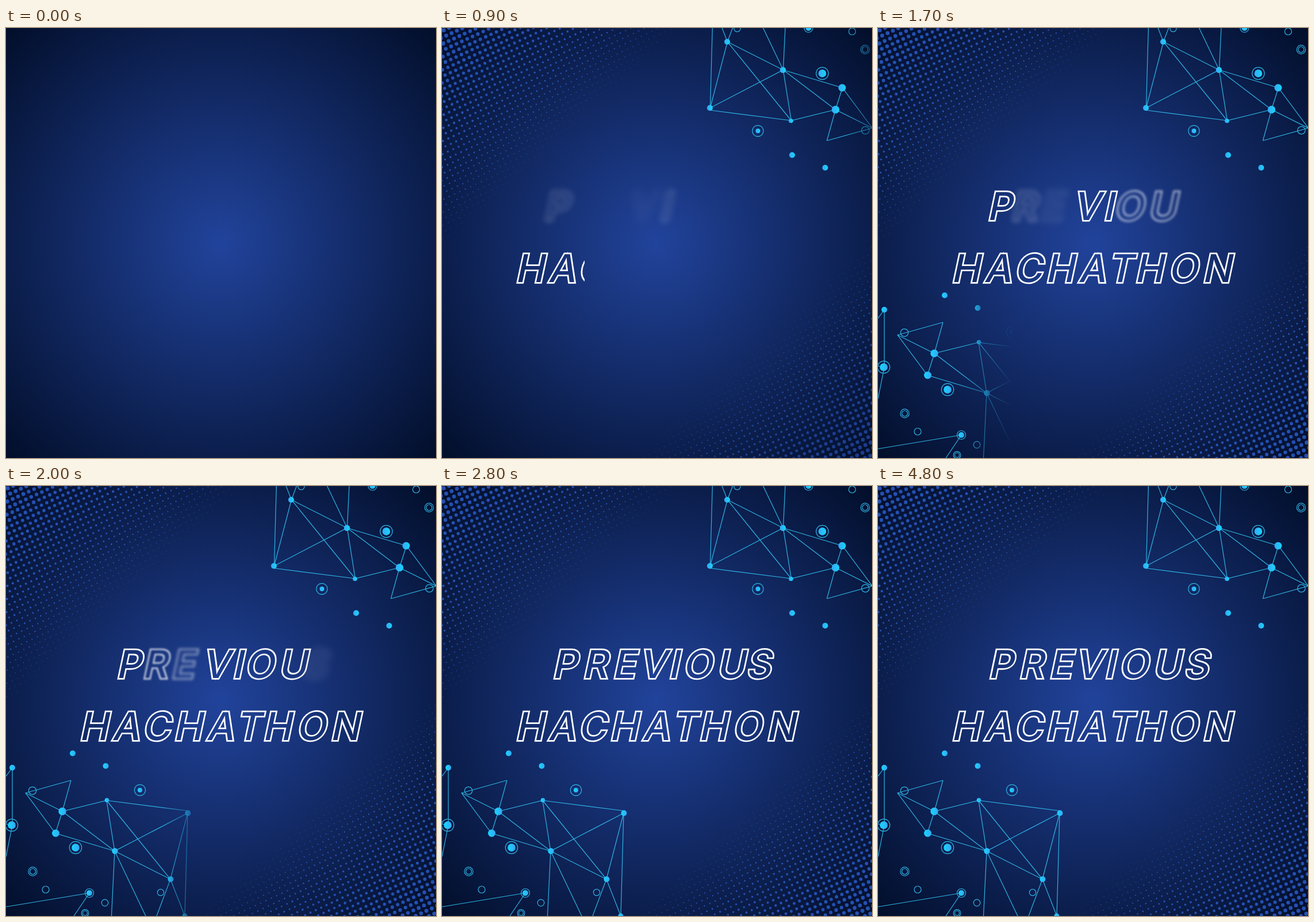
Animation of 748x748 px, one loop 5 s. Source, as an HTML page:

```html
<!DOCTYPE html>
<html lang="en">
<head>
<meta charset="utf-8">
<title>Previous Hackathon</title>
<style>
  html, body { margin: 0; width: 100%; height: 100%; overflow: hidden; background: #020f2b; }
  svg { display: block; width: 100vw; height: 100vh; }
  text { font: 500 66.8px Inter, "Open Sans", sans-serif; text-anchor: middle; }
  .outline { fill: none; stroke: #fff; stroke-width: 5.4; }
</style>
</head>
<body>
<svg id="stage" viewBox="0 0 748 748">
  <defs id="defs">
    <radialGradient id="sky" gradientUnits="userSpaceOnUse" cx="374" cy="374" r="529">
      <stop offset="0" stop-color="#21439b"/>
      <stop offset="1" stop-color="#020e2a"/>
    </radialGradient>
    <linearGradient id="dot">
      <stop offset="0" stop-color="#16d6ff"/>
      <stop offset="1" stop-color="#37a8f4"/>
    </linearGradient>
    <linearGradient id="feather">
      <stop offset=".91" stop-color="#fff"/>
      <stop offset="1" stop-color="#fff" stop-opacity="0"/>
    </linearGradient>
    <mask id="wipeTop" maskUnits="userSpaceOnUse" x="0" y="0" width="748" height="748">
      <rect width="1000" height="748" fill="url(#feather)"/>
    </mask>
    <mask id="wipeLow" maskUnits="userSpaceOnUse" x="0" y="0" width="748" height="748">
      <rect width="1000" height="748" fill="url(#feather)"/>
    </mask>
    <clipPath id="wipeText"><rect x="120" y="380" height="80"/></clipPath>
    <path id="halftone" fill="#2450b2"/>
    <g id="net" fill="none" stroke="#2fb3e3" stroke-width="1.2"></g>
  </defs>
  <rect width="748" height="748" fill="url(#sky)"/>
  <use id="dotsTop" href="#halftone"/>
  <use id="dotsLow" href="#halftone" transform="rotate(180 374 374)"/>
  <g mask="url(#wipeTop)"><use href="#net" transform="rotate(180 391.25 354)"/></g>
  <g mask="url(#wipeLow)"><use href="#net"/></g>
  <g id="lineOne"></g>
  <g id="lineTwo" clip-path="url(#wipeText)"></g>
</svg>
<script>
const NS = "http://www.w3.org/2000/svg";
const $ = id => document.getElementById(id);

function add(parent, tag, attrs, text) {
  const el = document.createElementNS(NS, tag);
  for (const k in attrs) el.setAttribute(k, attrs[k]);
  if (text) el.textContent = text;
  parent.appendChild(el);
  return el;
}

// Halftone corner: tilted lattice, dots shrink away from the corner
function buildHalftone() {
  let d = "";
  for (let i = -45; i < 60; i++) {
    for (let j = -45; j < 60; j++) {
      const x = 9.3 * i + 4.3 * j + 3, y = -4.3 * i + 9.3 * j + 4;
      const k = 1 - x / 410 - y / 380;
      if (x < -5 || y < -5 || k < 0) continue;
      const r = 0.45 + 3.2 * k;
      d += `M${(x - r).toFixed(1)} ${y.toFixed(1)}a${r.toFixed(2)} ${r.toFixed(2)} 0 1 0 ${(2 * r).toFixed(2)} 0a${r.toFixed(2)} ${r.toFixed(2)} 0 1 0 ${(-2 * r).toFixed(2)} 0`;
    }
  }
  $("halftone").setAttribute("d", d);
}

function buildNet() {
  const net = $("net");
  add(net, "path", { d:
    "M113 512L34 534L86 604L189 635L98 566L175 547L189 635L316 569" +
    "M113 512L98 566L86 604M34 534L98 566M175 547L316 565M175 547L286 684L189 635" +
    "M189 635L183.500 748M189 635L243 748M286 684L262 748M316 569L286 684L311 748M316 569L311 748" +
    "M145 708L0 732M145 708L118 748M0 505L11 490V590L0 645M0 588L10 590" });
  const disc = (x, y, r) => add(net, "circle", { cx: x, cy: y, r, fill: "url(#dot)", stroke: "none" });
  const ring = (x, y, r) => add(net, "circle", { cx: x, cy: y, r });
  [[316.5, 569, 5], [286.5, 684, 5], [189.500, 635, 5.2], [175.5, 546.5, 3.8], [98, 566, 6.7],
   [86.5, 604, 6.5], [173.5, 487, 5], [116, 465, 5], [11, 490, 5], [311, 748, 4.5],
   [233, 529, 4], [121, 629, 6.8], [145, 708, 5], [10, 590, 6.8]].forEach(a => disc(...a));
  [[233, 529, 9.7], [121, 629, 10.7], [145, 708, 7.5], [10, 590, 10.7], [269, 707, 5.6],
   [69, 702, 6], [46.5, 670.5, 7.6], [46.5, 670.5, 5], [46, 530, 6.7], [172, 725, 5.8],
   [137.5, 743, 6.3], [137.5, 743, 4]].forEach(a => ring(...a));
}

// Outlined slanted letter; its mask cuts the inside away
function letter(parent, ch, x, y) {
  if (!$("cut" + ch)) {
    const box = { x: -90, y: -110, width: 180, height: 160 };
    const m = add($("defs"), "mask", { id: "cut" + ch, maskUnits: "userSpaceOnUse", ...box });
    add(m, "rect", { ...box, fill: "#fff" });
    add(m, "text", { fill: "#000" }, ch);
  }
  const holder = add(parent, "g", {});
  const g = add(holder, "g", { transform: `translate(${x - 5.2} ${y}) skewX(-12)` });
  add(g, "text", { class: "outline", mask: `url(#cut${ch})` }, ch);
  return holder;
}

buildHalftone();
buildNet();

const word = (id, str, xs, y) => [...str].map((ch, i) => letter($(id), ch, xs[i], y));
const soft = word("lineOne", "PREVIOUS", [218, 271, 322, 371, 407.5, 449, 507, 558], 334);
word("lineTwo", "HACHATHON", [157, 213, 266, 321, 377, 426, 476, 535, 594], 442.3);
const starts = [450, 1200, 1350, 640, 480, 950, 950, 1650];

const part = (t, start, dur) => Math.min(1, Math.max(0, (t - start) / dur));
const easeOut = p => 1 - (1 - p) ** 2;
const smooth = p => p * p * (3 - 2 * p);

const wipe = (id, t, start, from, to) => {
  const edge = from + (to - from) * easeOut(part(t, start, 1000));
  $(id).firstElementChild.setAttribute("x", edge + 45 - 1000);
};

function draw(t) {
  $("dotsTop").setAttribute("opacity", part(t, 150, 400));
  $("dotsLow").setAttribute("opacity", part(t, 480, 600));
  wipe("wipeTop", t, 260, 410, 795);
  wipe("wipeLow", t, 1350, -47, 365);

  soft.forEach((el, i) => {
    const p = part(t, starts[i], 1700), rest = 1 - p;
    el.setAttribute("transform", `translate(${-26 * rest * rest} 0)`);
    el.setAttribute("opacity", smooth(Math.min(1, p / 0.7)));
    const blur = 12 * rest ** 3;
    el.style.filter = blur > 0.05 ? `blur(${blur}px)` : "none";
    el.style.display = p > 0 ? "" : "none";
  });

  const shown = easeOut(part(t, 770, 1000));
  $("wipeText").firstElementChild.setAttribute("width", shown ? 6 + 502 * shown : 0);
}

// The picture advances in tenths of a second
function tick() {
  draw(Math.floor((performance.now() % 5000) / 100) * 100);
  requestAnimationFrame(tick);
}
tick();
</script>
</body>
</html>
```
